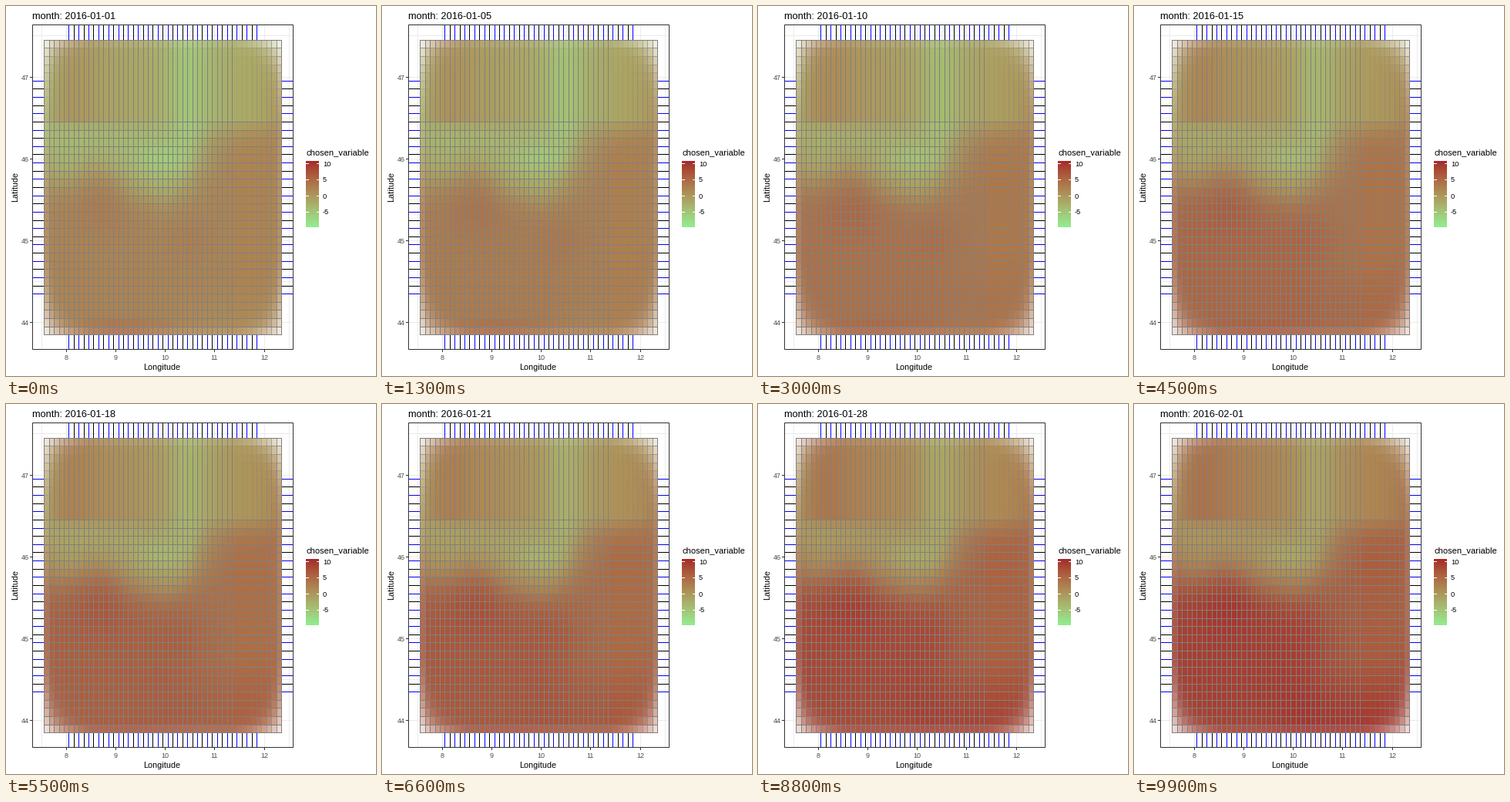
Animation, 480 px wide and 480 px high, one loop 10 s. Source, as a matplotlib script:

```python
import numpy as np
import matplotlib.pyplot as plt
from matplotlib.animation import FuncAnimation
from matplotlib.collections import LineCollection
from matplotlib.patches import Rectangle

SIZE, DPI = 480, 72
FRAMES, INTERVAL = 100, 100
DAYS = 31
ALPHA = 0.2          # opacity of one tile
SPAN = 10            # a tile covers SPAN x SPAN grid cells
NX, NY = 39, 27      # tile centres
CX, CY = NX + SPAN - 1, NY + SPAN - 1
LEFT, RIGHT, TOP, BOTTOM = 34, 372, 24, 445
V_MIN, V_MAX = -9.76, 10.7

plt.rcParams["font.family"] = "Liberation Sans"


def px(lon):
    return np.round(78.2 + 64.1 * (np.asarray(lon) - 8))


def py(lat):
    return np.round(410.4 - 106.3 * (np.asarray(lat) - 44))


# Colour scale: light green to brown, blended in Lab space
TO_XYZ = np.array([[0.4124, 0.3576, 0.1805],
                   [0.2126, 0.7152, 0.0722],
                   [0.0193, 0.1192, 0.9505]])
WHITE = TO_XYZ.sum(axis=1)


def rgb_to_lab(rgb):
    c = np.array(rgb) / 255
    lin = np.where(c > 0.04045, ((c + 0.055) / 1.055) ** 2.4, c / 12.92)
    f = np.cbrt(TO_XYZ @ lin / WHITE)
    return np.array([116 * f[1] - 16, 500 * (f[0] - f[1]), 200 * (f[1] - f[2])])


def lab_to_rgb(lab):
    fy = (lab[:, 0] + 16) / 116
    f = np.stack([fy + lab[:, 1] / 500, fy, fy - lab[:, 2] / 200], axis=1)
    lin = np.clip((f ** 3 * WHITE) @ np.linalg.inv(TO_XYZ).T, 0, 1)
    return np.where(lin > 0.0031308, 1.055 * lin ** (1 / 2.4) - 0.055, 12.92 * lin)


LOW, HIGH = rgb_to_lab((144, 238, 144)), rgb_to_lab((165, 42, 42))
RAMP = lab_to_rgb(LOW + np.linspace(0, 1, 512)[:, None] * (HIGH - LOW))


def shade(v):
    u = np.clip((v - V_MIN) / (V_MAX - V_MIN), 0, 1)
    return RAMP[np.round(u * 511).astype(int)]


# Temperature: warm plain, cold mountains north of a curved edge, local bumps.
# Later tiles hide earlier ones, so each centre shows up south-west of itself.
lons = 8.05 + 0.1 * np.arange(NX)
lats = 44.35 + 0.1 * np.arange(NY)
U, W = np.meshgrid(lons - 0.3, lats - 0.45)


def step(d, width):
    return 1 / (1 + np.exp(-d / width))


def bump(u, w, su, sw):
    return np.exp(-((U - u) / su) ** 2 / 2 - ((W - w) / sw) ** 2 / 2)


foot = np.interp(U, [7.6, 8.6, 9.3, 10.1, 10.5, 10.9],
                 [45.55, 45.95, 45.55, 45.5, 45.75, 46.4])
start = (2.2 - 6 * step(W - foot, 0.1)
         + 5.5 * bump(8.0, 46.55, 0.35, 0.09)
         + 2.6 * bump(9.1, 46.55, 0.6, 0.12)
         - 2.8 * bump(10.4, 46.45, 0.2, 0.2)
         - 2.6 * bump(9.9, 46.0, 0.35, 0.13)
         + 1.2 * bump(8.6, 45.4, 0.35, 0.25)
         + 0.8 * bump(10.4, 45.0, 0.25, 0.2)
         + 2.6 * bump(9.0, 43.9, 0.6, 0.08)
         - 0.8 * bump(11.0, 44.0, 0.5, 0.2))
rise = (4 + 3 * step(45.7 - W, 0.15) * step(10.4 - U, 0.15)
        + 4.5 * bump(11.1, 43.9, 0.7, 0.4)
        - 2.5 * bump(9.0, 43.9, 0.6, 0.1))


# Stacking: how much every tile adds to every cell, drawn row by row
def cover(n):
    cell, tile = np.ogrid[:n + SPAN - 1, :n]
    return (cell >= tile) & (cell < tile + SPAN)


mask = np.kron(cover(NY), cover(NX)).astype(float)
later = np.cumsum(mask[:, ::-1], axis=1)[:, ::-1] - mask
weight = mask * ALPHA * (1 - ALPHA) ** later
paper = 1 - weight.sum(axis=1, keepdims=True)


def cells(f):
    v = start + rise * f / (FRAMES - 1)
    rgb = weight @ shade(v.ravel()) + paper
    return np.clip(rgb, 0, 1).reshape(CY, CX, 3)


# Outlines: strength left after later tiles cover them
vert = np.zeros((CY, CX + 1))
horz = np.zeros((CY + 1, CX))
for r in range(NY):
    for c in range(NX):
        vert[r:r + SPAN, c + 1:c + SPAN] *= 1 - ALPHA
        vert[r:r + SPAN, [c, c + SPAN]] = 1
        horz[r + 1:r + SPAN, c:c + SPAN] *= 1 - ALPHA
        horz[[r, r + SPAN], c:c + SPAN] = 1

gx = px(7.55 + 0.1 * np.arange(CX + 1))
gy = py(43.85 + 0.1 * np.arange(CY + 1))

fig = plt.figure(figsize=(SIZE / DPI, SIZE / DPI), dpi=DPI, facecolor="white")
ax = fig.add_axes([0, 0, 1, 1])
ax.axis("off")


def lines(segs, color, z):
    ax.add_collection(LineCollection(segs, colors=color, linewidths=1, zorder=z,
                                     antialiaseds=False, capstyle="butt"),
                      autolim=False)


def vline(x, y0, y1):
    return [(x, y0), (x, y1)]


def hline(y, x0, x1):
    return [(x0, y), (x1, y)]


# Background grid
lines([vline(px(v), TOP, BOTTOM) for v in np.arange(7.5, 12.6, 0.5)]
      + [hline(py(v), LEFT, RIGHT) for v in np.arange(44, 47.6, 0.5)],
      "#ebebeb", 1)

# Guide lines between the panel edge and the tiles
for k, color in enumerate(("blue", "black")):
    segs = []
    for x in px(lons[k::2]):
        segs += [vline(x, TOP, gy[-1]), vline(x, gy[0], BOTTOM)]
    for y in py(lats[k::2]):
        segs += [hline(y, LEFT, gx[0]), hline(y, gx[-1], RIGHT)]
    lines(segs, color, 2)

mesh = ax.pcolormesh(gx, gy, cells(0), zorder=3)

segs, tints = [], []
for j, i in np.ndindex(vert.shape):
    segs.append(vline(gx[i], gy[j], gy[j + 1]))
    tints.append((0.5, 0.5, 0.5, vert[j, i]))
for j, i in np.ndindex(horz.shape):
    segs.append(hline(gy[j], gx[i], gx[i + 1]))
    tints.append((0.5, 0.5, 0.5, horz[j, i]))
lines(segs, tints, 4)

ax.add_patch(Rectangle((LEFT, TOP), RIGHT - LEFT, BOTTOM - TOP, fill=False,
                       ec="#333333", lw=1, zorder=5))


def label(x, y, s, size, ha="center", color="black", va="baseline", **kw):
    return ax.text(x, y, s, fontsize=size, ha=ha, va=va, color=color, zorder=6, **kw)


# Axes
for v in range(8, 13):
    lines([vline(px(v), BOTTOM, BOTTOM + 3)], "#333333", 5)
    label(px(v) + 0.5, 459, str(v), 9, color="#4d4d4d")
for v in range(44, 48):
    lines([hline(py(v), LEFT - 3, LEFT)], "#333333", 5)
    label(30, py(v) + 4, str(v), 9, ha="right", color="#4d4d4d")
label(202.5, 472, "Longitude", 10.8)
label(12.5, 235, "Latitude", 10.8, rotation=90, va="center")

# Legend
label(389, 193, "chosen_variable", 11.1, ha="left")
bar = shade(np.linspace(V_MAX, V_MIN, 86))[:, None]
ax.imshow(bar, extent=(389, 406, 287, 201), aspect="auto",
          interpolation="nearest", zorder=3)
for v in (10, 5, 0, -5):
    y = np.round(246 - 4.2 * v)
    lines([hline(y, 389, 392), hline(y, 403, 406)], "white", 4)
    label(411, y + 3.5, str(v), 9.2, ha="left")

title = label(34.5, 17, "", 12.8, ha="left")
ax.set_xlim(0, SIZE)
ax.set_ylim(SIZE, 0)


def update(f):
    mesh.set_array(cells(f))
    day = np.datetime64("2016-01-01") + int(f * DAYS // (FRAMES - 1))
    title.set_text(f"month: {day}")
    return mesh, title


anim = FuncAnimation(fig, update, frames=FRAMES, interval=INTERVAL,
                     repeat=True, repeat_delay=0)
plt.show()
```
